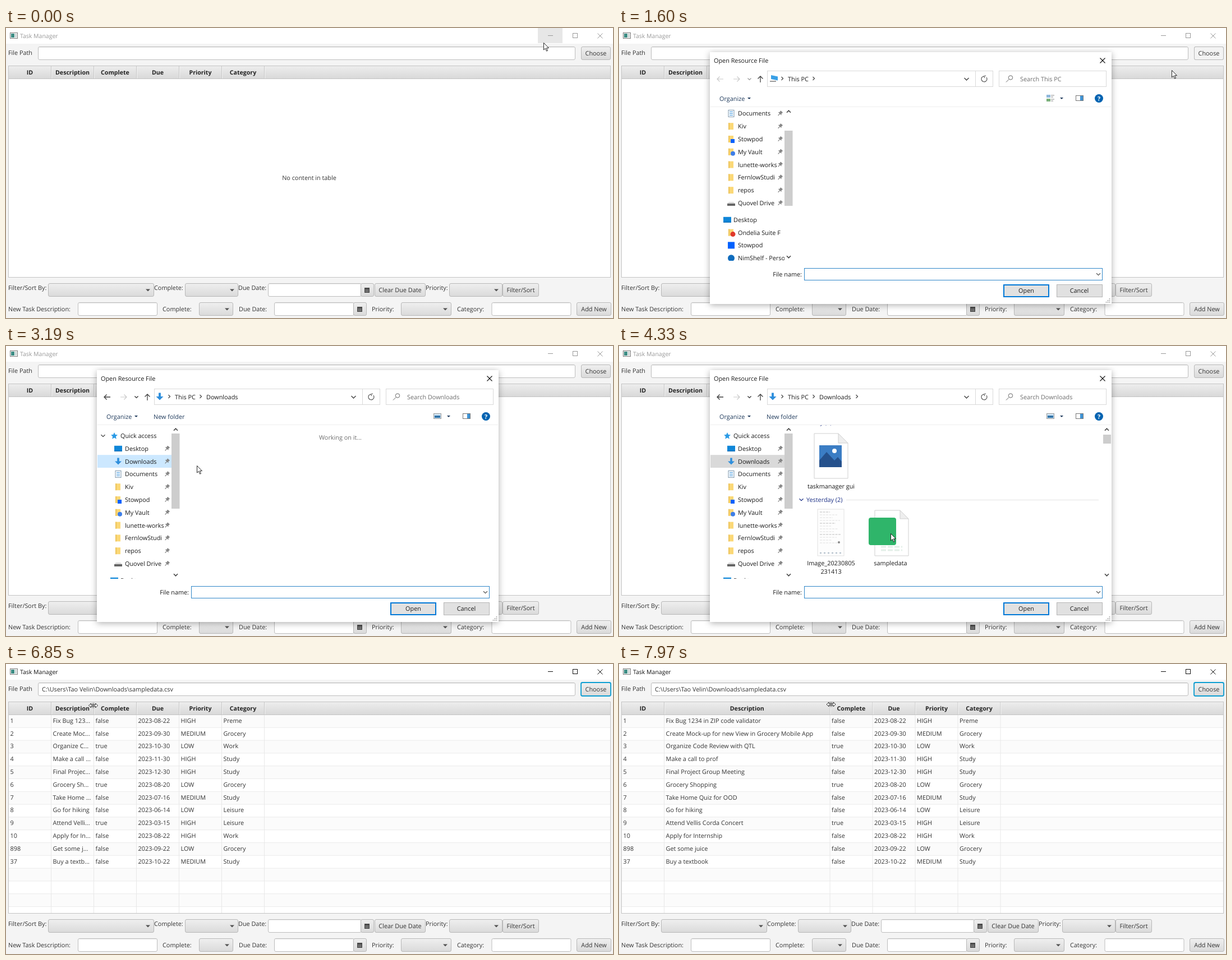
Write an HTML page that moves like this. It is 1082x517 px and loops after 8000 ms.

```html
<!DOCTYPE html>
<html lang="en">
<head>
<meta charset="utf-8">
<title>Task Manager</title>
<style>
html, body { margin: 0; width: 100%; height: 100%; overflow: hidden; background: #f4f4f4; }
svg { display: block; }
text { font: 10.85px "Open Sans", "Noto Sans", sans-serif; fill: #333; white-space: pre; text-rendering: geometricPrecision; }
.head { font-size: 10.6px; font-weight: 700; fill: #222; }
.mid { text-anchor: middle; }
.end { text-anchor: end; }
.dark text { fill: #1a1a1a; }
.dark .blue { fill: #1e395b; }
.dark .group { fill: #1e3287; }
.dark .soft { fill: #6d6d6d; }
.dark .white { fill: #fff; }
.shadow { filter: drop-shadow(0 2px 6px rgba(0, 0, 0, .32)); }
</style>
</head>
<body>
<svg id="stage" width="1082" height="517" viewBox="0 0 1082 517"></svg>
<script>
const LOOP = 8000, ROW = 22.8;
const $ = id => document.getElementById(id);

// ---- drawing helpers ----
const rect = (x, y, w, h, fill, more = '') => `<rect x="${x}" y="${y}" width="${w}" height="${h}" fill="${fill}" ${more}/>`;
const text = (x, y, s, cls = '', more = '') => `<text x="${x}" y="${y}" class="${cls}" ${more}>${s}</text>`;
const fillPath = (d, fill, more = '') => `<path d="${d}" fill="${fill}" ${more}/>`;
const line = (d, color, w = 1, more = '') => `<path d="${d}" fill="none" stroke="${color}" stroke-width="${w}" ${more}/>`;
const circle = (x, y, r, fill) => `<circle cx="${x}" cy="${y}" r="${r}" fill="${fill}"/>`;
const group = (id, body, more = '') => `<g id="${id}" ${more}>${body}</g>`;
const move = (x, y, body) => `<g transform="translate(${x} ${y})">${body}</g>`;
const chevron = (x, y, turn, size, color, w = 1.2) =>
  line(`M${-size} ${-size / 2}L0 ${size / 2}L${size} ${-size / 2}`, color, w, `transform="translate(${x} ${y}) rotate(${turn})"`);
const triangle = (x, y, color, s = 4) => fillPath(`M${x - s} ${y - s / 2}h${2 * s}l${-s} ${s}z`, color);

const button = (x, y, w, label, fill = 'url(#face)') =>
  rect(x + .5, y + .5, w - 1, 23, fill, 'rx="2.5" stroke="#b8b8b8"') + text(x + w / 2, y + 16, label, 'mid');
const combo = (x, y, w) => button(x, y, w, '') + triangle(x + w - 11, y + 12.5, '#505050');
const field = (x, y, w) => rect(x + .5, y + .5, w - 1, 23, '#fff', 'rx="2.5" stroke="#bdbdbd"') + line(`M${x + 2} ${y + 1.5}h${w - 4}`, '#ebebeb');
const datePicker = (x, y, w) => field(x, y, w - 22) + button(x + w - 24, y, 24, '') +
  move(x + w - 17, y + 8, rect(0, 0, 9, 9, '#4a4a4a') + line('M1 4h7M1 6.5h7M3 3v5M6 3v5', '#9a9a9a', .7));
const ring = (id, x, y, w) => group(id, rect(x, y, w, 24, 'none', 'rx="2.5" stroke="#0c9ed2" stroke-width="1.8"'));

// ---- main window ----
const controls = c => line('M966 13.5h9', c) + rect(1010.5, 9.5, 8, 8, 'none', `stroke="${c}"`) + line('M1054.5 9.5l9 9m0-9l-9 9', c);

const mainWindow = () =>
  rect(0, 0, 1082, 517, '#f4f4f4') + rect(0, 0, 1082, 28, '#fff') +
  rect(7.5, 8.5, 13, 10, '#fff', 'stroke="#777"') + rect(9, 10, 6, 7, '#3c8c84') + rect(16, 10, 3, 7, '#c9d4d4') +
  group('minHover', rect(948, 0, 44, 27, '#e7e7e7') + line('M966 13.5h9', '#222')) +
  group('titleOff', text(25, 18, 'Task Manager', '', 'style="font-size:10.5px;fill:#999"') + controls('#999')) +
  group('titleOn', text(25, 18, 'Task Manager', '', 'style="font-size:10.5px;fill:#111"') + controls('#111')) +
  text(4, 48, 'File Path') + field(57, 33, 958) +
  group('pathText', text(64, 49, 'C:\\Users\\Tao Velin\\Downloads\\sampledata.csv')) + ring('pathRing', 57, 33, 958) +
  button(1025, 33, 53, 'Choose') + group('chooseHover', button(1025, 33, 53, 'Choose', '#f3f3f3')) + ring('chooseRing', 1025, 33, 53) +
  rect(4.5, 67.5, 1073, 377, '#fff', 'stroke="#c4c4c4"') + rect(5, 68, 1072, 22, 'url(#bar)') + line('M5 90.5h1072', '#c4c4c4') +
  group('table', '') +
  group('empty', text(540.5, 271, 'No content in table', 'mid')) +
  text(4, 467, 'Filter/Sort By:') + combo(75, 455, 189) + text(264, 467, 'Complete:') + combo(319, 455, 95) +
  text(414, 467, 'Due Date:') + datePicker(467, 455, 189) + button(657, 455, 91, 'Clear Due Date') +
  text(748, 467, 'Priority:') + combo(790, 455, 95) + button(885, 455, 65, 'Filter/Sort') +
  text(4, 505, 'New Task Description:') + field(128, 489, 142) + text(279, 505, 'Complete:') + combo(344, 489, 61) +
  text(415, 505, 'Due Date:') + datePicker(478, 489, 165) + text(652, 505, 'Priority:') + combo(704, 489, 90) +
  text(804, 505, 'Category:') + field(865.5, 489, 142) + button(1017, 489, 62, 'Add New');

const HEADS = ['ID', 'Description', 'Complete', 'Due', 'Priority', 'Category'];
const TASKS = `1|Fix Bug 1234 in ZIP code validator|false|2023-08-22|HIGH|Preme
2|Create Mock-up for new View in Grocery Mobile App|false|2023-09-30|MEDIUM|Grocery
3|Organize Code Review with QTL|true|2023-10-30|LOW|Work
4|Make a call to prof|false|2023-11-30|HIGH|Study
5|Final Project Group Meeting|false|2023-12-30|HIGH|Study
6|Grocery Shopping|true|2023-08-20|LOW|Grocery
7|Take Home Quiz for OOD|false|2023-07-16|MEDIUM|Study
8|Go for hiking|false|2023-06-14|LOW|Leisure
9|Attend Vellis Corda Concert|true|2023-03-15|HIGH|Leisure
10|Apply for Internship|false|2023-08-22|HIGH|Work
898|Get some juice|false|2023-09-22|LOW|Grocery
37|Buy a textbook|false|2023-10-22|MEDIUM|Study`.split('\n').map(r => r.split('|'));

const pen = document.createElement('canvas').getContext('2d');
function shorten(s, width) {
  pen.font = '10.85px "Open Sans", "Noto Sans", sans-serif';
  if (pen.measureText(s).width <= width) return s;
  while (s && pen.measureText(s + '...').width > width) s = s.slice(0, -1);
  return s + '...';
}

function table(extra, filled) {
  const left = i => 4 + 76 * i + (i > 1 ? extra : 0);
  let out = '';
  if (filled) {
    for (let r = 0; r < 16; r++) {
      const y = 90.5 + r * ROW;
      out += rect(5, y, 1072, Math.min(ROW, 444 - y), r % 2 ? '#fff' : '#fbfbfb') + line(`M5 ${y}h1072`, r ? '#ebebeb' : '#c4c4c4');
    }
    for (let i = 1; i < 7; i++) out += line(`M${left(i) + .5} 91V444`, '#e8e8e8');
    TASKS.forEach((task, r) => task.forEach((s, i) =>
      out += text(left(i) + 3.6, 104.8 + r * ROW, shorten(s, left(i + 1) - left(i) - 7))));
  }
  HEADS.forEach((s, i) => out += text((left(i) + left(i + 1)) / 2 + .5, 83, s, 'head mid') +
    line(`M${left(i + 1) + .5} 68v22`, '#c6c6c6') + line(`M${left(i + 1) + 1.5} 68v22`, '#f2f2f2'));
  return out;
}

// ---- icons, centred on 0,0 ----
const YELLOW = '#fbd877', BLUE = '#2f8fdc';
const downArrow = s => fillPath(`M${-.3 * s} ${-s}h${.6 * s}V0H${s}L0 ${s}L${-s} 0h${.7 * s}z`, BLUE);
const screen = rect(-7, -5, 14, 10, '#0f86d8') + line('M-7 4.5h14', '#0a64ac');
const smallFolder = rect(-5, -6, 9, 12, YELLOW) + rect(-5, -6, 2, 12, '#edc35b');
const page = rect(-5, -6, 10, 12, '#fff', 'stroke="#7b95ab"') + line('M-3-3h6M-3 0h6M-3 3h6', BLUE);
const drive = fillPath('M-7 1l3-3h8l3 3z', '#ddd') + rect(-7, 1, 14, 4, '#666');
const landscape = (w, h) => rect(-w / 2, -h / 2, w, h, '#7fc0ea') +
  fillPath(`M${-w / 2} ${h / 2}v${-h * .3}l${w * .3} ${-h * .25}l${w * .25} ${h * .25}l${w * .2} ${-h * .1}l${w * .25} ${h * .2}v${h * .2}z`, '#2d6695');
const star = fillPath('M0-6l1.8 4 4.2.4-3.2 2.9 1 4.4L0 3.4-3.8 5.7l1-4.4L-6-1.6l4.2-.4z', '#2b9be6');
const pin = line('M-2.5-4h5M-1.7-4v4M1.7-4v4M-3.5 0h7M0 0v5', '#777', 1.1, 'transform="rotate(42)"') +
  rect(-1.7, -4, 3.4, 4, '#888', 'transform="rotate(42)"');
const pc = rect(-5, -5, 12, 7, '#3aa0e6', 'transform="skewY(12)"') + line('M-7 5h11', '#777', 1.5);

// ---- dialog ----
const NAV = [
  ['Quick access', star], ['Desktop', screen], ['Downloads', downArrow(6)], ['Documents', page], ['Kiv', smallFolder],
  ['Stowpod', smallFolder + rect(-1, 0, 7, 7, '#0061fe')], ['My Vault', smallFolder + circle(3, 3, 4, '#3d7ee8')],
  ['lunette-works', smallFolder], ['FernlowStudi', smallFolder], ['repos', smallFolder], ['Quovel Drive', drive],
  ['Desktop', screen], ['Ondelia Suite F', smallFolder + circle(3, 3, 4.5, '#e0392b')],
  ['Stowpod', rect(-6, -6, 12, 12, '#0061fe')], ['NimShelf - Perso', circle(0, 0, 6, '#0f6cbd')]
];
const navY = i => 160 + i * ROW + (i > 10 ? 7 : 0);

function navPane() {
  let items = '', arrows = '';
  NAV.forEach(([label, icon], i) => {
    const y = navY(i), top = i === 0 || i === 11, pinned = i > 0 && i < 11;
    items += move(top ? 193 : 200, y, icon) + text(top ? 204 : 212, y + 4, label) + (pinned ? move(287, y, pin) : '');
    if (!pinned) arrows += chevron(top ? 173 : 182, y, i > 11 ? -90 : 0, top ? 3.5 : 3, i ? '#bbb' : '#444');
  });
  return `<g clip-path="url(#navClip)">` + group('nav', rect(163, 0, 132, ROW, '#cce8ff', 'id="navRow"') + items + group('navArrows', arrows)) + '</g>' +
    rect(295, 141, 14.5, 274, '#fff') + rect(295, 156, 14.5, 134, '#cdcdcd', 'id="navThumb"') +
    chevron(302.5, 149, 180, 3.5, '#444', 1.6) + chevron(302.5, 408, 0, 3.5, '#444', 1.6);
}

const section = (y, label, lineX) => chevron(325, y, 0, 3.5, '#1e3287') + text(334, y + 4, label, 'group') + line(`M${lineX} ${y + .5}H855`, '#e4e4e4');
const bigFolder = rect(0, 0, 24, 35, YELLOW) + fillPath('M0 0L9 4V40L0 36z', '#fde7a8') + line('M9 4V39', '#eec65f', .8);
const OVERLAYS = [
  ['3D Objects', fillPath('M10 22l12-6 12 6v13l-12 6-12-6z', '#35bcd8') + fillPath('M10 22l12-6 12 6-12 5z', '#9ae6f2') + fillPath('M22 27l12-5v13l-12 6z', '#1698b8')],
  ['Desktop', rect(10, 18, 25, 18, '#1296e8') + fillPath('M10 36L35 18v18z', '#0a80d2')],
  ['Documents', rect(12, 9, 20, 27, '#fff', 'stroke="#bbb"') + line('M15 15l2-3 2 3M22 14h7M15 20h14M15 24h7M15 28h14M15 32h14', BLUE) + rect(23, 22, 7, 4, '#345')],
  ['Downloads', move(23, 25, downArrow(11))],
  ['Music', circle(16, 34, 5, '#1296e8') + fillPath('M19 34V8h3c0 8 12 9 8 20 0-6-4-9-8-10v16z', '#1296e8')],
  ['Pictures', move(23, 26, landscape(24, 18))],
  ['Videos', rect(10, 10, 24, 28, '#333') + line('M12.5 11v26M31.5 11v26', '#ddd', 2, 'stroke-dasharray="2 2"') + move(22, 17, landscape(14, 11)) + move(22, 30, landscape(14, 11))]
];
const folders = section(157, 'Folders (7)', 393) +
  OVERLAYS.map(([label, art], i) => {
    const x = 340 + (i % 2) * 241.5, y = 176 + (i >> 1) * 54;
    return move(x, y, bigFolder + art) + text(x + 42, y + 14, label);
  }).join('') + section(395, 'Devices and drives (4)', 450) + circle(608, 416, 4.5, '#aaa') + text(623, 420, 'OS (C:)') +
  rect(863, 156, 14, 188, '#cdcdcd');

const sheet = (x, y, w, h, fold) => fillPath(`M${x} ${y}h${w - fold}l${fold} ${fold}V${y + h}h${-w}z`, '#fff', 'stroke="#cfcfcf"') +
  fillPath(`M${x + w - fold} ${y}v${fold}h${fold}z`, '#eee', 'stroke="#cfcfcf"');
const phonePage = () => {
  let out = rect(354, 291, 47, 83, '#fdfdfd', 'stroke="#e2e2e2"');
  for (let i = 0; i < 12; i++) out += line(`M358 ${296 + i * 5}h${18 + (i * 13) % 21}`, i % 4 ? '#d8d8d8' : '#aaa', .8, 'stroke-dasharray="4 1.5"');
  return out + circle(392, 350, 2, '#888') + line('M358 369h39', '#9ab', 1.5, 'stroke-dasharray="3 4"');
};
const files = section(136, 'Today (1)', 385) + sheet(348, 156, 60, 80, 17) +
  rect(357, 177, 40, 39, '#3b7dc4') + fillPath('M357 216v-12l13-15 14 15 6-6 7 8v10z', '#25518c') + circle(384, 187, 4, '#fff') +
  text(378, 254, 'taskmanager gui', 'mid') + section(274, 'Yesterday (2)', 405) + phonePage() +
  text(378, 391, 'Image_20230805', 'mid') + text(378, 406, '231413', 'mid') +
  rect(434, 286, 100, 112, '#d9d9d9', 'id="picked"') + sheet(456, 293, 60, 81, 15) +
  line('M467 358h38M467 364h38', '#e3efe8', 3, 'stroke-dasharray="9 3"') + rect(445, 306, 49, 49, '#2fb56a', 'rx="4"') +
  text(484, 391, 'sampledata', 'mid');

const dialog = () =>
  rect(162, 43, 716, 449, '#fff', 'class="shadow"') +
  text(169, 62, 'Open Resource File') + line('M857.5 53.5l9 9m0-9l-9 9', '#111', 1.1) +
  line('M186 91h-11m4.5-4.5L175 91l4.5 4.5', '#c9c9c9', 1.2) + line('M204 91h11m-4.5-4.5l4.5 4.5-4.5 4.5', '#c9c9c9', 1.2) +
  line('M252 97V86m-4.5 4.5L252 86l4.5 4.5', '#444', 1.3) + chevron(232.5, 91, 0, 3, '#999') +
  rect(264.5, 76.5, 402, 28, '#fff', 'stroke="#d9d9d9"') + line('M635.5 77v28', '#d9d9d9') + rect(677.5, 76.5, 191, 28, '#fff', 'stroke="#d9d9d9"') +
  chevron(619.5, 91, 0, 4, '#444', 1.4) + line('M655 88a5 5 0 1 1-5-2m0 0l4-1m-4 1l2 3', '#555', 1.2) +
  `<circle cx="698" cy="88.5" r="3.7" fill="none" stroke="#666"/>` + line('M695 91.5l-5 5', '#666') +
  chevron(291, 90, -90, 3, '#444') + text(301, 95, 'This PC') + chevron(347, 90, -90, 3, '#444') +
  group('atPc', move(276, 90, pc) + text(715, 95, 'Search This PC', 'soft') + move(769, 125,
    rect(-7, -6, 7, 5, '#8fb8dc') + rect(-7, 1, 7, 5, '#7ab07a') + line('M1-5h6M1-2h4M1 2h6M1 5h4', '#888'))) +
  group('atDownloads', move(274, 90, downArrow(6.5)) + text(357, 95, 'Downloads') + text(715, 95, 'Search Downloads', 'soft') +
    text(263, 130, 'New folder', 'blue') + line('M186 91h-11m4.5-4.5L175 91l4.5 4.5', '#444', 1.3) + chevron(232.5, 91, 0, 3, '#444') +
    move(769, 125, rect(-6.5, -4.5, 13, 9, '#cfe5f6', 'stroke="#999"') + rect(-5, -1, 10, 4, '#3274a8'))) +
  text(179, 130, 'Organize', 'blue') + triangle(232, 125.5, '#1e395b', 3) + triangle(789, 125.5, '#1e395b', 3) +
  rect(814.5, 120.5, 13, 9, '#fff', 'stroke="#777"') + rect(822, 121, 5, 8, '#3f94d6') +
  circle(855.5, 125.5, 7.5, '#0063b1') + text(855.5, 129.5, '?', 'mid white', 'style="font-weight:700"') +
  line('M163 140.5h714', '#efefef') +
  group('navPane', navPane()) +
  `<g clip-path="url(#listClip)">` + group('folders', folders) + group('files', group('list', files) + rect(863, 158, 14, 16, '#cdcdcd')) + '</g>' +
  group('listArrows', chevron(869.5, 149, 180, 3.5, '#444', 1.6) + chevron(869.5, 408, 0, 3.5, '#444', 1.6)) +
  group('pathEnd', chevron(424, 90, -90, 3, '#444')) +
  group('working', text(596, 167, 'Working on it...', 'mid soft')) +
  text(326, 443, 'File name:', 'end') + rect(330.5, 428.5, 531, 21, '#fff', 'stroke="#2f86c8"') + chevron(854.5, 439, 0, 3.5, '#555') +
  group('fileName', rect(333, 431, 61, 16, '#2a80d0') + text(333.5, 443, 'sampledata', 'white')) +
  rect(686, 458, 80, 21, '#e1e1e1', 'id="open" stroke="#0078d7" stroke-width="2"') + text(726, 472, 'Open', 'mid') +
  rect(780.5, 457.5, 81, 22, '#e1e1e1', 'stroke="#b5b5b5"') + text(820.5, 472, 'Cancel', 'mid') +
  line('M874.5 482v9M871.5 485v6M868.5 488v3', '#aaa', 1.8, 'stroke-dasharray="1.8 1.2"');

// ---- pointer ----
const INK = 'stroke="#111" stroke-width=".9" stroke-linejoin="round"';
const pointers =
  group('arrow', fillPath('M.5.5V13l3-2.7 2 4.9 2-.9-2-4.6h4z', '#fff', INK)) +
  group('hand', fillPath('M1.5 0q1.5 0 1.5 1.5V6l5 1q2 .4 2 2.5L9 15H2.5L-2.5 9.5q0-1.8 2.5-.3V1.5Q0 0 1.5 0z', '#fff', INK) + line('M5 7v2.5M7.3 7.5v2', '#111', .7)) +
  group('resize', fillPath('M-8 0l4-4v2.8h8V-4l4 4-4 4V1.2h-8V4z', '#fff', INK) + line('M-1.2-4.5v9M1.2-4.5v9', '#444', .8));

const gradient = (id, a, b) => `<linearGradient id="${id}" x2="0" y2="1"><stop stop-color="${a}"/><stop offset="1" stop-color="${b}"/></linearGradient>`;
$('stage').innerHTML = '<defs>' + gradient('face', '#efefef', '#dadada') + gradient('bar', '#ededed', '#d9d9d9') +
  `<clipPath id="navClip">${rect(163, 141, 132, 274, '#000')}</clipPath><clipPath id="listClip">${rect(310, 141, 567, 274, '#000')}</clipPath></defs>` +
  mainWindow() + group('dialog', dialog(), 'class="dark"') + group('pointer', pointers);

// ---- timeline: each entry holds until the next ----
const POINTER = [
  [0, 958, 26], [130, 932, 25], [250, 908, 21], [370, 894, 18], [510, 901, 16], [670, 998, 29], [830, 1009, 30], [970, 1024, 37],
  [1090, 1033, 42], [1600, 985, 75], [1720, 850, 150], [1870, 700, 230], [1990, 610, 275], [2110, 556, 300], [2260, 223, 207, 'hand'],
  [2410, 236, 196, 'hand'], [2650, 233, 202, 'hand'], [2800, 235, 204, 'hand'], [3190, 340, 213], [3310, 346, 226], [3460, 366, 245],
  [3580, 395, 268], [3700, 425, 290], [3820, 450, 308], [3940, 470, 322], [4060, 480, 330], [4330, 484, 334], [4600, 490, 340],
  [4730, 625, 415], [4850, 725, 455], [4990, 728, 468], [5110, 729, 473], [5590, 724, 466], [5710, 722, 461], [5830, 720, 458],
  [5990, 737, 420], [6110, 522, 103], [6250, 425, 96], [6370, 310, 88], [6490, 220, 81], [6610, 175, 76], [6730, 157, 75, 'resize'], [6850, 155.5, 74, 'resize']
];
const WIDEN = [[0, 0], [7250, 18], [7370, 58], [7490, 108], [7610, 158], [7730, 196], [7850, 214], [7970, 219.5]];
const FADE = [[0, 0, 1], [1450, .7, .985], [1600, 1, 1], [5350, .78, .9915], [5470, .22, .95], [5590, 0, 1]];
const HOVER = [[0, 1], [130, .6], [250, .25], [370, 0]];

const at = (track, t) => track.findLast(k => k[0] <= t);
const show = (id, on) => $(id).style.display = on ? '' : 'none';
const within = (t, a, b = LOOP) => t >= a && t < b;
let drawn = '';

function render(t) {
  const active = within(t, 510, 1330) || t >= 5230, loaded = t >= 5590, extra = at(WIDEN, t)[1];
  show('titleOn', active);
  show('titleOff', !active);
  $('minHover').style.opacity = at(HOVER, t)[1];
  show('pathRing', within(t, 510, 1330));
  show('chooseHover', within(t, 970, 1870));
  show('chooseRing', t >= 5470);
  show('pathText', loaded);
  show('empty', !loaded);
  if (drawn !== extra + '/' + loaded) {
    $('table').innerHTML = table(extra, loaded);
    drawn = extra + '/' + loaded;
  }

  const [, alpha, scale] = at(FADE, t);
  show('dialog', alpha > 0);
  $('dialog').setAttribute('opacity', alpha);
  $('dialog').setAttribute('transform', `translate(520 267) scale(${scale}) translate(-520 -267)`);
  const inside = t >= 3070, listed = t >= 3310, scrolled = t < 2410;
  show('atPc', !inside);
  show('atDownloads', inside);
  show('navPane', t >= 1600);
  show('folders', within(t, 1870, 3070));
  show('working', inside && !listed);
  show('files', listed);
  show('pathEnd', listed);
  show('listArrows', within(t, 1870, 3070) || listed);
  $('list').setAttribute('transform', `translate(0 ${t < 4210 ? 21 : 0})`);
  $('nav').setAttribute('transform', `translate(0 ${scrolled ? -76 : 0})`);
  $('navThumb').setAttribute('y', scrolled ? 183 : 156);
  show('navArrows', within(t, 2260, 3460));
  show('navRow', t >= 2260);
  $('navRow').setAttribute('y', navY(scrolled ? 5 : 2) - ROW / 2);
  $('navRow').setAttribute('fill', t < 3070 ? '#e5f3ff' : t < 4210 ? '#cce8ff' : '#d9d9d9');
  show('picked', t >= 4600);
  show('fileName', t >= 4600);
  $('open').setAttribute('fill', t < 4850 ? '#e1e1e1' : t < 4990 ? '#e5f1fb' : '#c4e0f7');

  const [, x, y, kind = 'arrow'] = at(POINTER, t);
  // while dragging, the pointer stays on the column edge
  $('pointer').setAttribute('transform', `translate(${x + extra * 1.014} ${t < 7250 ? y : 72})`);
  for (const id of ['arrow', 'hand', 'resize']) show(id, id === kind);
}

const start = performance.now();
function tick() {
  render((performance.now() - start) % LOOP);
  requestAnimationFrame(tick);
}
tick();
</script>
</body>
</html>
```
